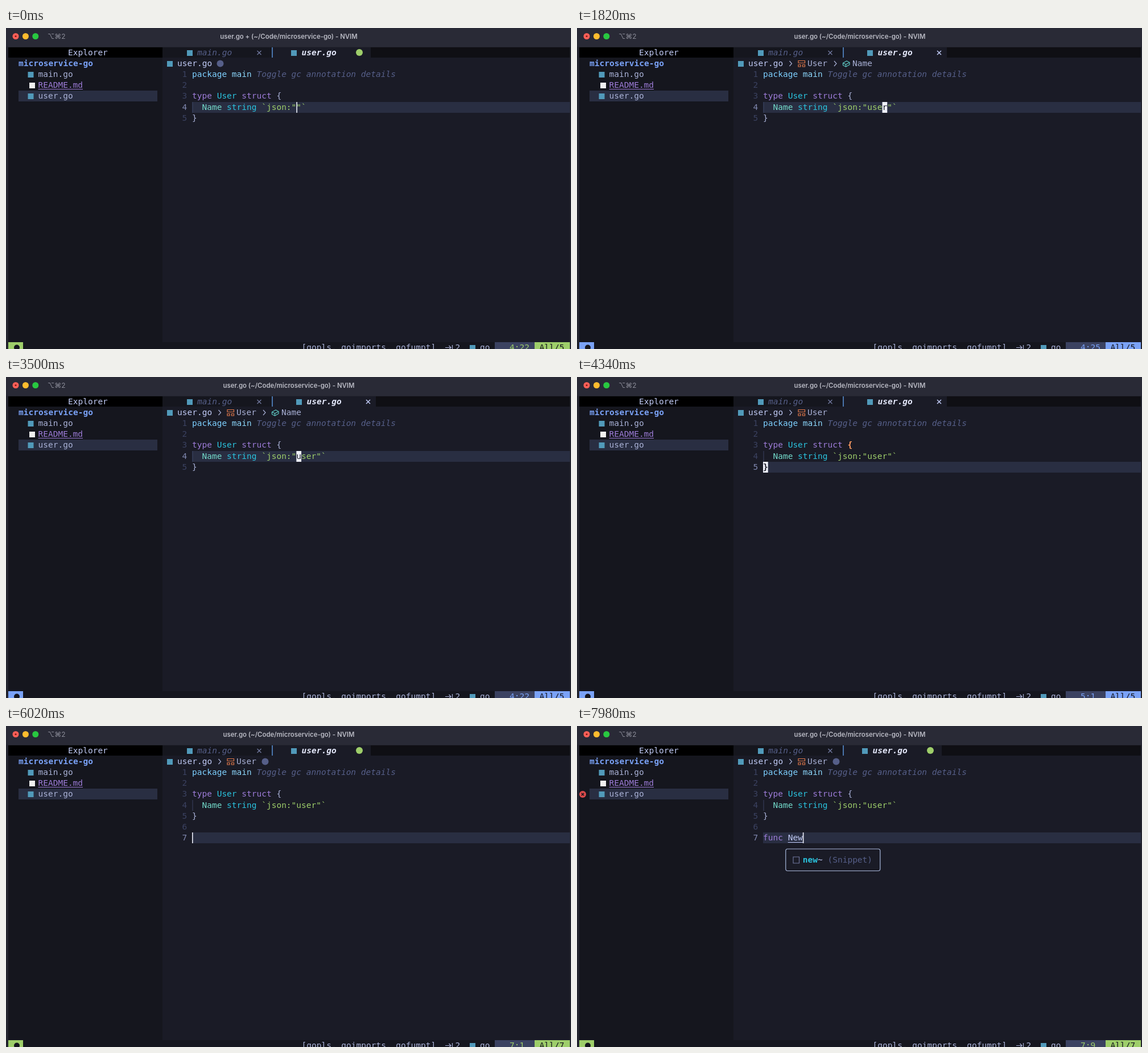
An HTML page with a canvas that plays this animation: 993 by 564 pixels, repeating every 8 s.

```html
<!DOCTYPE html>
<html lang="en">
<head>
<meta charset="utf-8">
<title>Editor session</title>
<style>
html, body { margin: 0; width: 100%; height: 100%; overflow: hidden; background: #1a1b26; }
canvas { display: block; }
</style>
</head>
<body>
<canvas id="stage" width="993" height="564"></canvas>
<script>
const ctx = document.getElementById('stage').getContext('2d');
const LOOP = 8000, CELL = 8.73, CODE_X = 327;
const MONO = '14.5px "DejaVu Sans Mono", "Liberation Mono", monospace';
const C = {
  fg: '#c0caf5', bg: '#1a1b26', side: '#15161e', dim: '#565f89', edge: '#3b4261', line: '#292e42',
  purple: '#9d7cd8', cyan: '#7dcfff', type: '#2ac3de', teal: '#73daca', green: '#9ece6a',
  blue: '#7aa2f7', orange: '#ff9e64', go: '#519aba', cursor: '#eef0fa'
};
const MODE = { insert: C.green, normal: C.blue, command: '#e0af68' };

// Each entry changes part of the editor state at its time in ms.
const steps = [
  [0, { mode: 'insert', title: 'user.go +', dirty: true, crumbs: 0, tag: '', func: '',
        row: 4, col: 22, lines: 5, match: false, error: false, popup: false, mark: false }],
  [350, { tag: 'u', col: 23 }],
  [770, { tag: 'us', col: 24 }],
  [910, { tag: 'use', col: 25 }],
  [1050, { tag: 'user', col: 26 }],
  [1330, { mode: 'normal', col: 25 }],
  [1540, { mode: 'command' }],
  [1820, { mode: 'normal', title: 'user.go', dirty: false, crumbs: 2 }],
  [2240, { col: 22 }],
  [2730, { mode: 'command' }],
  [3010, { mode: 'normal' }],
  [3220, { mode: 'command' }],
  [3500, { mode: 'normal' }],
  [4130, { row: 5, col: 1, match: true }],
  [4200, { crumbs: 1 }],
  [4410, { mode: 'insert', row: 6, lines: 6, match: false, dirty: true }],
  [4620, { row: 7, lines: 7 }],
  [6090, { func: 'f', col: 2 }],
  [6230, { func: 'fu', col: 3 }],
  [6370, { func: 'fun', col: 4 }],
  [6510, { func: 'func', col: 5 }],
  [6580, { func: 'func ', col: 6 }],
  [6720, { func: 'func N', col: 7 }],
  [6790, { error: true }],
  [6930, { func: 'func Ne', col: 8 }],
  [7000, { popup: true }],
  [7070, { func: 'func New', col: 9 }],
  [7280, { mark: true }]
];

const stateAt = t => Object.assign({}, ...steps.filter(s => s[0] <= t).map(s => s[1]));
const rowY = row => Math.round(33.5 + row * 19.2);
const cellX = col => CODE_X + col * CELL;

function rect(x, y, w, h, color) {
  ctx.fillStyle = color;
  ctx.fillRect(x, y, w, h);
}

function dot(x, y, r, color) {
  ctx.fillStyle = color;
  ctx.beginPath();
  ctx.arc(x, y, r, 0, 7);
  ctx.fill();
}

function text(str, x, row, color, style = '') {
  ctx.font = style + ' ' + MONO;
  ctx.fillStyle = color;
  ctx.fillText(str, x, rowY(row) + 14);
}

// Draws [text, colour, style] pieces one after another on the code grid.
function code(line, ...parts) {
  let col = 0;
  for (const [str, color, style] of parts) {
    text(str, cellX(col), line + 1, color, style);
    col += str.length;
  }
}

function stroke(d, color, width = 1.3) {
  ctx.strokeStyle = color;
  ctx.lineWidth = width;
  ctx.stroke(new Path2D(d));
}

const goIcon = (x, row) => rect(x - 5, rowY(row) + 5, 10, 10, C.go);
const cross = (x, y, r, color, w) =>
  stroke(`M${x - r} ${y - r}l${2 * r} ${2 * r}m0 ${-2 * r}l${-2 * r} ${2 * r}`, color, w);
const chevron = x => stroke(`M${x - 2} 58l4 4.5l-4 4.5`, '#a9b1d6', 1.2);

function drawTitleBar(s) {
  rect(0, 0, 993, 33, '#292a36');
  ['#ff5f57', '#febc2e', '#28c840'].forEach((c, i) => dot(17 + i * 17.4, 14.5, 5.5, c));
  dot(17, 14.5, 1.6, '#7e1a16');
  ctx.fillStyle = '#b9bac4';
  ctx.font = '600 11.4px Inter, "Open Sans", sans-serif';
  ctx.textAlign = 'center';
  ctx.fillText(s.title + ' (~/Code/microservice-go) - NVIM', 497, 19);
  ctx.textAlign = 'left';
  ctx.fillStyle = '#8b8c98';
  ctx.font = '12px Inter, "DejaVu Sans", sans-serif';
  ctx.fillText('⌥⌘2', 73, 19);
}

function drawSidebar(s) {
  rect(4, 34, 271, 518, C.side);
  rect(4, 34, 271, 18, '#000');
  text('Explorer', 109, 0, C.fg);
  text('microservice-go', 22, 1, C.blue, 'bold');
  rect(22, rowY(4), 244, 19, C.line);
  goIcon(43.5, 2);
  text('main.go', 56.5, 2, '#a9b1d6');
  rect(41, rowY(3) + 5, 10, 10, '#f0f0f0');
  text('README.md', 56.5, 3, C.purple);
  rect(56.5, 107, 78.5, 1, C.purple);
  goIcon(43.5, 4);
  text('user.go', 56.5, 4, '#a9b1d6');
  if (s.error) {
    dot(10, 120, 6, '#db4b4b');
    cross(10, 120, 2.2, C.side, 1.6);
  }
}

function drawTabs(s) {
  const x = s.dirty ? 506 : 515;
  rect(275, 34, 716, 18, '#0f0f14');
  rect(275, 34, 192, 18, C.side);
  rect(467, 34, s.dirty ? 174 : 183, 18, C.bg);
  rect(467, 34, 2, 18, '#4a76ad');
  goIcon(323, 0);
  text('main.go', 336, 0, C.dim, 'italic');
  cross(445, 43.5, 3.5, '#737aa2');
  goIcon(x, 0);
  text('user.go', x + 13.5, 0, '#e4e8fa', 'italic bold');
  if (s.dirty) dot(621, 43, 6, C.green);
  else cross(636.5, 43.5, 3.5, C.fg, 1.5);
}

function drawBreadcrumbs(s) {
  goIcon(288, 1);
  text('user.go', 301, 1, C.fg);
  if (s.crumbs > 0) {
    chevron(375.5);
    stroke('M389 57.5h11.5v4h-11.5zM389 64.5h4v3.5h-4zM396.5 64.5h4v3.5h-4z', '#e0784a', 1.2);
    text('User', 405, 1, '#a9b1d6');
  }
  if (s.crumbs > 1) {
    chevron(454);
    stroke('M467.5 61.5l6.5-3.5l5 2.5v4l-6.5 3.5l-5-2.5zl5 2.5l6.5-3.5m-6.5 3.5v4', '#5cc5c0', 1.2);
    text('Name', 484, 1, '#a9b1d6');
  }
  if (s.dirty) dot(s.crumbs ? 455.5 : 376.5, 62.5, 6, C.dim);
}

function drawCode(s) {
  rect(CODE_X, rowY(s.row + 1), 664, 19, C.line);
  for (let n = 1; n <= s.lines; n++)
    text(n, 309.5, n + 1, n === s.row ? '#8088b0' : C.edge);
  rect(327.5, rowY(5), 1, 19, C.edge);

  code(1, ['package', C.cyan], [' main ', '#8bd5fa'], ['Toggle gc annotation details', C.dim, 'italic']);
  code(3, ['type ', C.purple], ['User', C.type], [' struct ', C.purple],
    s.match ? ['{', C.orange, 'bold'] : ['{', '#a9b1d6']);
  code(4, ['  Name ', C.teal], ['string ', C.type], ['`json:"' + s.tag + '"`', C.green]);
  code(5, ['}', '#a9b1d6']);
  const done = s.func.startsWith('func');
  code(7, [s.func.slice(0, 4), done ? C.purple : C.fg], [s.func.slice(4), C.fg]);
  if (s.mark) rect(cellX(5), 204, 3 * CELL, 1, C.fg);
}

function drawCursor(s) {
  const x = cellX(s.col - 1), y = rowY(s.row + 1);
  if (s.mode === 'insert') rect(x, y, 1.6, 19, C.cursor);
  if (s.mode === 'normal') {
    rect(x, y, CELL, 19, C.cursor);
    const under = s.row === 5 ? '}' : s.tag[s.col - 22];
    text(under, x, s.row + 1, C.bg, s.row === 5 ? 'bold' : '');
  }
}

function drawPopup() {
  ctx.beginPath();
  ctx.roundRect(366.8, 216, 166, 38.5, 3.5);
  ctx.fillStyle = C.bg;
  ctx.fill();
  ctx.strokeStyle = '#a9b8dc';
  ctx.lineWidth = 1.2;
  ctx.stroke();
  stroke('M380 230h10.5v11h-10.5z', '#737aa2', 1.1);
  text('new', cellX(8), 10, C.type, 'bold');
  text('~', cellX(11), 10, C.fg);
  text('(Snippet)', cellX(13), 10, C.dim);
}

function drawStatus(s) {
  const color = MODE[s.mode];
  rect(4, 552, 987, 12, C.side);
  rect(4, 552, 26, 12, color);
  dot(19, 561.5, 5, C.side);
  text('[gopls, goimports, gofumpt]', 519.5, 27, '#a9b1d6');
  stroke('M772 561.5h10m-3.5-3.5l3.5 3.5l-3.5 3.5M784.5 557v9', '#a9b1d6', 1.2);
  text('2', 789.5, 27, '#a9b1d6');
  goIcon(820, 27);
  text('go', 833, 27, '#a9b1d6');
  rect(859, 552, 70, 12, C.edge);
  text(s.row + ':' + s.col, 885, 27, color);
  rect(929, 552, 62, 12, color);
  text('All/' + s.lines, 937.5, 27, C.side);
}

function draw(now) {
  const s = stateAt(now % LOOP);
  rect(0, 0, 993, 564, '#24252f');
  rect(275, 34, 716, 530, C.bg);
  drawTitleBar(s);
  drawSidebar(s);
  drawTabs(s);
  drawBreadcrumbs(s);
  drawCode(s);
  drawCursor(s);
  if (s.popup) drawPopup();
  drawStatus(s);
}

const start = performance.now();
function tick() {
  draw(performance.now() - start);
  requestAnimationFrame(tick);
}
tick();
</script>
</body>
</html>
```
